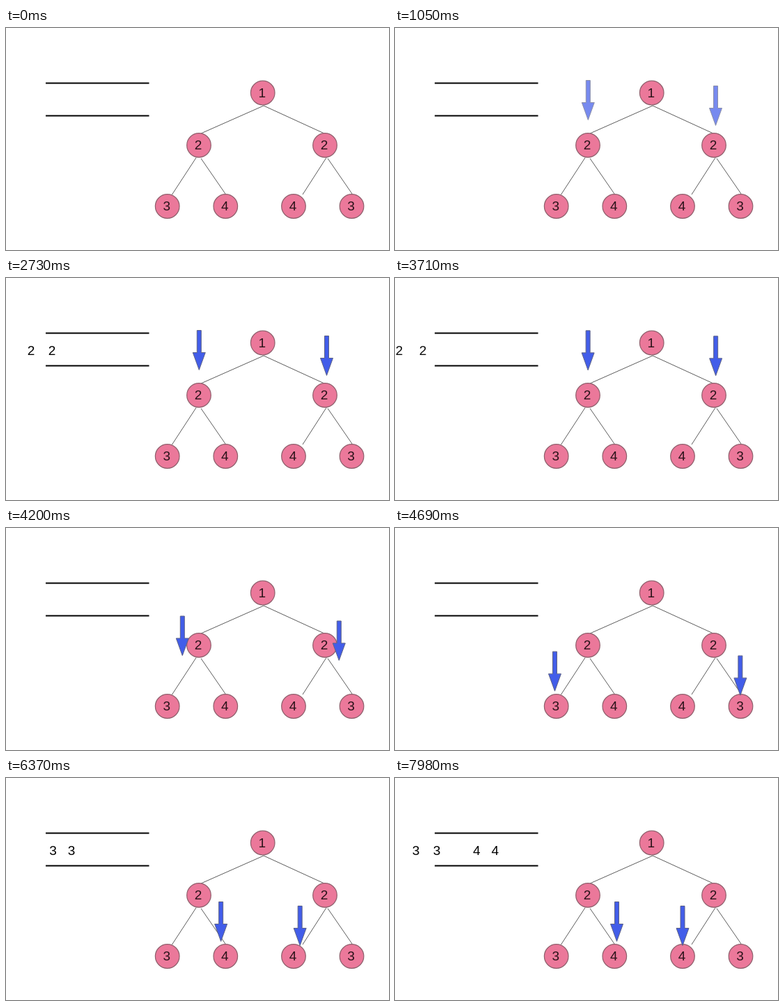
An HTML page for the animation above (8000 ms loop, 550 by 320 pixels).

```html
<!DOCTYPE html>
<html lang="en">
<head>
<meta charset="utf-8">
<title>Symmetric tree check with a queue</title>
<style>
html, body { margin: 0; width: 100%; height: 100%; overflow: hidden; background: #fff; }
svg { display: block; }
text { font: 19px "Liberation Sans", Arial, sans-serif; text-anchor: middle; }
.edge { stroke: #5c5c5c; stroke-width: 1; }
.rail { stroke: #000; stroke-width: 2; }
.node circle { fill: #eb789a; stroke: #8f5f6c; stroke-width: 1.2; }
.node text { fill: #2a1219; }
.arrow { fill: #425de9; stroke: #5d6286; stroke-width: 1; }
</style>
</head>
<body>
<svg id="stage" width="550" height="320" viewBox="0 0 550 320"></svg>
<script>
const LOOP = 8000, STEP = 70, MOVE = 1150;
const stage = document.getElementById('stage');

const line = (cls, x1, y1, x2, y2) =>
  `<line class="${cls}" x1="${x1}" y1="${y1}" x2="${x2}" y2="${y2}"/>`;
const node = (label, x, y) =>
  `<g class="node"><circle cx="${x}" cy="${y}" r="17.3"/><text x="${x - 1}" y="${y + 6}">${label}</text></g>`;
const arrow = id =>
  `<path id="${id}" class="arrow" d="M-3 0H3V32H9L0 57L-9 32H-3Z"/>`;
const digit = (id, label) => `<text id="${id}" y="111">${label}</text>`;

stage.innerHTML = [
  line('rail', 57, 79.5, 205.5, 79.5),
  line('rail', 57, 126.5, 205.5, 126.5),
  line('edge', 370, 112, 280, 152),
  line('edge', 370, 112, 457, 152),
  line('edge', 273, 187, 238.5, 240),
  line('edge', 280, 188, 315, 239),
  line('edge', 460, 187, 426, 240),
  line('edge', 462, 188, 497, 239),
  node(1, 368.7, 93.5),
  node(2, 277, 169),
  node(2, 458, 169),
  node(3, 231.7, 257),
  node(4, 315.3, 257),
  node(4, 413, 257),
  node(3, 496.5, 257),
  arrow('left'), arrow('right'),
  digit('two1', 2), digit('two2', 2),
  digit('three1', 3), digit('three2', 3),
  digit('four1', 4), digit('four2', 4)
].join('');

const el = id => document.getElementById(id);
const clamp = u => Math.min(1, Math.max(0, u));
const ease = u => u * u * u * (10 + u * (6 * u - 15));
const progress = (t, start, length = MOVE) => ease(clamp((t - start) / length));
const mix = (a, b, p) => a + (b - a) * p;

function putArrow(id, xs, ys, down, across, alpha) {
  const x = mix(mix(xs[0], xs[1], down), xs[2], across);
  const y = mix(ys[0], ys[1], down);
  el(id).setAttribute('transform', `translate(${x} ${y})`);
  el(id).setAttribute('opacity', alpha);
}

function putDigit(id, x, alpha) {
  el(id).setAttribute('x', x);
  el(id).setAttribute('opacity', alpha);
}

function draw(t) {
  const shown = progress(t, 480, 920);
  const down = progress(t, 3625);
  const across = progress(t, 5515);
  putArrow('left', [277.3, 229.3, 318.5], [75.5, 178.5], down, across, shown);
  putArrow('right', [460.5, 496, 413], [83.5, 184.5], down, across, shown);

  const twosOut = progress(t, 2155);
  const twos = t < 1610 ? 0 : 1 - progress(t, 3600, 560);
  putDigit('two1', mix(66, 6, twosOut), twos);
  putDigit('two2', mix(92.3, 40, twosOut), twos);

  const threesOut = progress(t, 7475);
  const threes = t < 4900 ? 0 : 1;
  putDigit('three1', mix(67.5, -29, threesOut), threes);
  putDigit('three2', mix(94, 6, threesOut), threes);

  const fours = t < 6860 ? 0 : 1;
  putDigit('four1', 117.3, fours);
  putDigit('four2', 143.7, fours);
}

const begin = performance.now();
function tick() {
  const t = (performance.now() - begin) % LOOP;
  draw(Math.floor(t / STEP) * STEP);
  requestAnimationFrame(tick);
}
tick();
</script>
</body>
</html>
```
